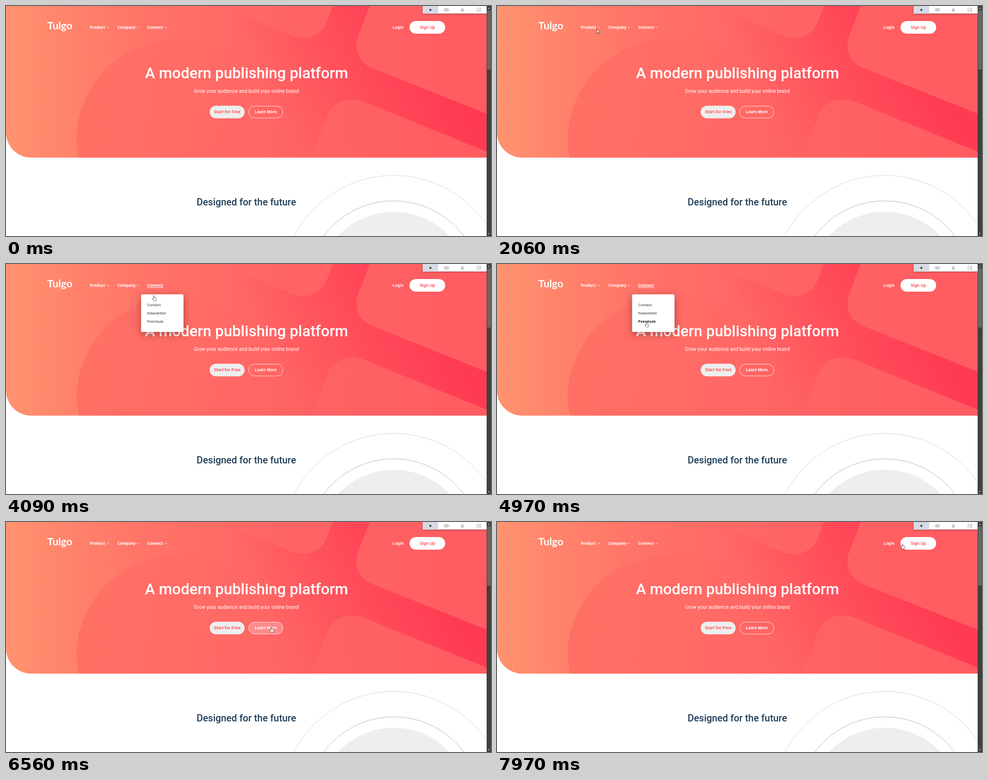
Animation, 1000 px wide and 474 px high, one loop 8 s. Source, as an HTML page:

```html
<!DOCTYPE html>
<html lang="en">
<head>
<meta charset="utf-8">
<title>Publishing platform</title>
<style>
html, body { margin: 0; width: 100%; height: 100%; overflow: hidden; background: #fff; }
svg { display: block; }
text { white-space: pre; }
.mid { text-anchor: middle; }
.head { font-family: Roboto, sans-serif; font-weight: 500; }
.btn { font: bold 8.4px "Liberation Sans", Arial, sans-serif; }
.nav { font: bold 8px "Open Sans", sans-serif; fill: #fff; }
.panel text { font: 7.8px "Open Sans", sans-serif; fill: #1c1c1e; }
.panel rect { fill: #fff; filter: drop-shadow(0 4px 8px rgba(60, 0, 0, .42)); }

/* menus: --on is 1 while a menu is open */
.menu { --on: 0; animation: 8s step-end infinite; }
.menu .panel, .menu .line { opacity: var(--on); }
.menu .line { stroke: #fff; stroke-width: .8; }
.menu use { transform: scaleY(calc(1 - 2 * var(--on))); transform-box: fill-box; transform-origin: center; }
.product { animation-name: product; }
.company { animation-name: company; }
.connect { animation-name: connect; }
@keyframes product { 0% { --on: 0 } 28.375% { --on: 1 } 36.2%, 100% { --on: 0 } }
@keyframes company { 0% { --on: 0 } 36.2% { --on: 1 } 43.625%, 100% { --on: 0 } }
@keyframes connect { 0% { --on: 0 } 43.625% { --on: 1 } 69.625%, 100% { --on: 0 } }

/* hovered menu items turn bold */
.panel .item { animation: 8s step-end infinite; }
.panel .i1 { animation-name: item1; }
.panel .i2 { animation-name: item2; }
.panel .i3 { animation-name: item3; }
@keyframes item1 { 0% { font-weight: 400 } 53.4% { font-weight: 700 } 56.6% { font-weight: 400 } 64.1% { font-weight: 700 } 65.4%, 100% { font-weight: 400 } }
@keyframes item2 { 0% { font-weight: 400 } 56.6% { font-weight: 700 } 59.5% { font-weight: 400 } 62.85% { font-weight: 700 } 64.1%, 100% { font-weight: 400 } }
@keyframes item3 { 0% { font-weight: 400 } 59.5% { font-weight: 700 } 62.85%, 100% { font-weight: 400 } }

.learn { fill: #fff; stroke: #fff; stroke-width: .8; fill-opacity: 0; animation: learn 8s linear infinite; }
@keyframes learn {
  0%, 78.4% { fill-opacity: 0 }
  81%, 88% { fill-opacity: .24 }
  89% { fill-opacity: .17 }
  90.25%, 100% { fill-opacity: 0 }
}

/* pointer path and shape */
.pointer { animation: move 8s linear infinite; }
@keyframes move {
  0%, 16% { transform: translate(330px, 480px); animation-timing-function: ease-out }
  25.75%, 31.6% { transform: translate(206px, 48px) }
  35.6%, 36.9% { transform: translate(252px, 47px) }
  41.5%, 43.6% { transform: translate(304px, 49px) }
  46.25%, 50.1% { transform: translate(305px, 60px) }
  55% { transform: translate(305px, 84px) }
  59.5%, 60.6% { transform: translate(307px, 110px) }
  62.1% { transform: translate(308px, 120px) }
  67.5%, 69.6% { transform: translate(314px, 47px) }
  74.9% { transform: translate(564px, 153px) }
  79.5%, 80.6% { transform: translate(541px, 219px) }
  87.5% { transform: translate(570px, 208px) }
  89% { transform: translate(727.5px, 108px) }
  90.25%, 91.4% { transform: translate(775px, 84px) }
  95.5%, 98.1% { transform: translate(822px, 60px) }
  99.6%, 100% { transform: translate(836px, 45px) }
}
.arrow, .hand, .beam { animation: 8s step-end infinite; opacity: 0; }
.arrow { animation-name: arrow; }
.hand { animation-name: hand; }
.beam { animation-name: beam; }
@keyframes arrow {
  0% { opacity: 0 } 16% { opacity: 1 } 28.375% { opacity: 0 }
  70.5% { opacity: 1 } 73.7% { opacity: 0 } 75.6% { opacity: 1 }
  78.4% { opacity: 0 } 87.6% { opacity: 1 } 99.3%, 100% { opacity: 0 }
}
@keyframes hand {
  0% { opacity: 0 } 28.375% { opacity: 1 } 70.5% { opacity: 0 }
  78.4% { opacity: 1 } 87.6% { opacity: 0 } 99.3%, 100% { opacity: 1 }
}
@keyframes beam { 0% { opacity: 0 } 73.7% { opacity: 1 } 75.6%, 100% { opacity: 0 } }
</style>
</head>
<body>
<svg width="1000" height="474" viewBox="0 0 1000 474">
  <defs>
    <linearGradient id="base">
      <stop offset="0" stop-color="#ff936f"/>
      <stop offset=".13" stop-color="#ff836b"/>
      <stop offset=".32" stop-color="#ff7168"/>
      <stop offset=".56" stop-color="#ff6564"/>
      <stop offset="1" stop-color="#ff5b61"/>
    </linearGradient>
    <linearGradient id="disc" gradientUnits="userSpaceOnUse" x1="145" y1="220" x2="500" y2="160">
      <stop offset="0" stop-color="#ff5b5c" stop-opacity=".46"/>
      <stop offset="1" stop-color="#ff5b5c" stop-opacity="0"/>
    </linearGradient>
    <linearGradient id="arms" gradientUnits="userSpaceOnUse" x1="600" y1="300" x2="900" y2="150">
      <stop offset="0" stop-color="#ff3b53" stop-opacity="0"/>
      <stop offset="1" stop-color="#ff3b53"/>
    </linearGradient>
    <clipPath id="hero"><path d="M0 0H991V312.5H52A52 52 0 0 1 0 260.5Z"/></clipPath>
    <path id="chevron" d="M0 0L2.4 2.3L4.8 0" fill="none" stroke="#fff" stroke-width=".9"/>
  </defs>

  <g clip-path="url(#hero)">
    <rect width="991" height="313" fill="url(#base)"/>
    <path d="M150.500 313C138 262 149 205 188 150C228 96 300 66 375 66C425 66 465 80 500 110V313Z" fill="url(#disc)"/>
    <path fill="url(#arms)" d="M440 0L588 61C620 74 650 60 660 36L674 0H750L726 62C716 92 728 118 760 130L991 222V300L745 200C710 184 675 195 663 225L628 313H400V0Z"/>
  </g>

  <g fill="none">
    <circle cx="799.5" cy="581" r="232" stroke="#cfcfcf" stroke-width=".8"/>
    <circle cx="799.5" cy="581.5" r="180" stroke="#a6a6a6" stroke-width=".8"/>
    <circle cx="799.5" cy="581.5" r="157.500" fill="#eee"/>
  </g>

  <text x="85" y="47.500" font-family="Lato, sans-serif" font-weight="700" font-size="21.500" fill="#fff">Tulgo</text>
  <text class="head mid" x="496" y="149.300" font-size="31.400" fill="#fff">A modern publishing platform</text>
  <text class="mid" x="495.500" y="179" font-family="Roboto, sans-serif" font-size="10.300" fill="#fff">Grow your audience and build your online brand</text>
  <text class="head mid" x="495.500" y="411" font-size="19.900" fill="#1f3e5a">Designed for the future</text>

  <g class="btn mid">
    <rect x="420" y="205.500" width="72" height="26" rx="13" fill="#eee"/>
    <text x="456" y="221.300" fill="#ff5055" style="font-size:8.800px">Start for Free</text>
    <rect class="learn" x="500.400" y="206.400" width="70.400" height="24.400" rx="12.200"/>
    <text x="535.500" y="221.300" fill="#fff">Learn More</text>
    <text x="808.300" y="47" fill="#fff">Login</text>
    <rect x="832" y="31" width="73.500" height="26" rx="13" fill="#fff"/>
    <text x="868.800" y="47" fill="#ff5055">Sign Up</text>
  </g>

  <g class="menu product">
    <text class="nav" x="172.800" y="47.200">Product</text>
    <use href="#chevron" x="207.800" y="43"/>
    <path class="line" d="M173 48.600h32"/>
    <g class="panel">
      <rect x="160.500" y="62.500" width="87.500" height="111.500" rx="2.500"/>
      <text x="173" y="87">Overview</text>
      <text x="173" y="104">Pricing</text>
      <text x="173" y="121">Marketplace</text>
      <text x="173" y="138">Features</text>
      <text x="173" y="155">Integrations</text>
    </g>
  </g>
  <g class="menu company">
    <text class="nav" x="229.500" y="47.200">Company</text>
    <use href="#chevron" x="269.400" y="43"/>
    <path class="line" d="M229.500 48.600h37"/>
    <g class="panel">
      <rect x="217.500" y="62.500" width="87.500" height="94.500" rx="2.500"/>
      <text x="229.500" y="87">About</text>
      <text x="229.500" y="104">Team</text>
      <text x="229.500" y="121">Blog</text>
      <text x="229.500" y="138">Careers</text>
    </g>
  </g>
  <g class="menu connect">
    <text class="nav" x="291" y="47.200">Connect</text>
    <use href="#chevron" x="327.200" y="43"/>
    <path class="line" d="M291 48.600h33"/>
    <g class="panel">
      <rect x="278.500" y="62.500" width="87.500" height="77.500" rx="2.500"/>
      <text class="item i1" x="291" y="87">Contact</text>
      <text class="item i2" x="291" y="104">Newsletter</text>
      <text class="item i3" x="291" y="121">Peerdusk</text>
    </g>
  </g>

  <!-- toolbar -->
  <g>
    <rect x="859" width="132" height="15.500" fill="#fff" style="filter:drop-shadow(0 1px 1.500px rgba(0,0,0,.4))"/>
    <rect x="859" width="32" height="15.500" fill="#d6dae4"/>
    <path d="M875 5.500v5M872.500 8h5" stroke="#222" stroke-width="1.300"/>
    <g fill="none" stroke="#c2c4c8" stroke-width="1.300">
      <path d="M902 7.800Q908 1.500 914 7.800Q908 14 902 7.800Z"/>
      <circle cx="908" cy="7.800" r="1.900" fill="#c2c4c8"/>
      <path d="M939.300 7.500V5.800a1.700 1.700 0 0 1 3.400 0V7.500"/>
      <rect x="938.700" y="7.800" width="4.600" height="3" fill="#c2c4c8"/>
      <path d="M974 4.500h-2.800v6.500h2.800M979 7.800h-4M976.500 6L974.700 7.800L976.500 9.600M975 4.300h3.500v7h-3.500"/>
    </g>
  </g>

  <!-- scrollbar -->
  <rect x="991" width="9" height="474" fill="#404040"/>
  <rect x="992" y="9" width="7.500" height="122" fill="#686868"/>
  <path d="M993.500 5.800L995.500 3.500L997.500 5.800ZM993.500 468.300L995.500 470.600L997.500 468.300Z" fill="#c8c8c8"/>

  <g class="pointer">
    <path class="arrow" d="M0 0V8.600L2 6.900L3.300 9.800L4.700 9.200L3.400 6.300H6.100Z" fill="#fff" stroke="#222" stroke-width=".7"/>
    <path class="hand" d="M-.8 .7C-.8-.4 .9-.4 .9 .7V4L4.200 4.700Q5.300 5 5.200 6.300L4.500 10.200H-.6L-3.300 6.500C-3.500 5.500-2.300 5.200-1.700 5.900L-.8 6.900Z" fill="#fff" stroke="#333" stroke-width=".7"/>
    <path class="beam" d="M-1.500-4.500H1.500M0-4.500V4.500M-1.500 4.500H1.500" fill="none" stroke="#8a3038" stroke-width=".6"/>
  </g>
</svg>
</body>
</html>
```
